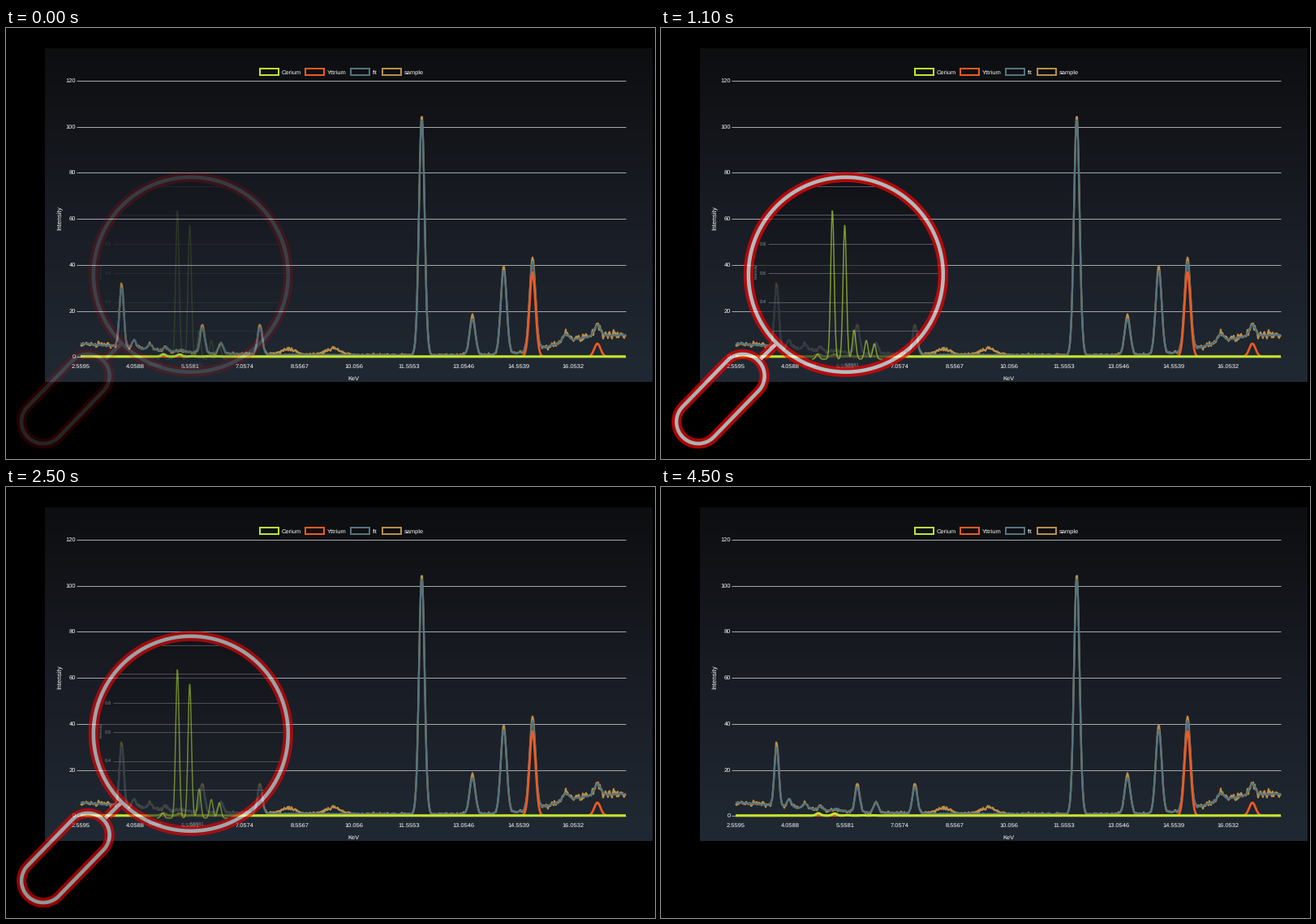
Animation, 800 px wide and 531 px high, one loop 4800 ms. Source, as a matplotlib script:

```python
import numpy as np
import matplotlib.pyplot as plt
from matplotlib.animation import FuncAnimation
from matplotlib.colors import LinearSegmentedColormap
from matplotlib.patches import Circle, Rectangle

W, H, DPI = 800, 531, 100
PX = 72 / DPI
FRAMES, STEP = 48, 100
PEAK, FADE = 1700, 2000  # time of full opacity and length of each fade, ms

LIME, ORANGE, TEAL, OCHRE = "#bee632", "#ee5a22", "#56737e", "#b98e48"
WHITE, RED, GRID = "#fafafa", "#fa0000", "#a4a8ac"

plt.rcParams.update({"font.family": "Liberation Sans", "toolbar": "None",
                     "text.hinting": "none", "lines.solid_capstyle": "butt",
                     "lines.solid_joinstyle": "round"})
fig = plt.figure(figsize=(W / DPI, H / DPI), dpi=DPI, facecolor="black")
ax = fig.add_axes([0, 0, 1, 1])
ax.axis("off")


def line(x, y, color, width, z):
    return ax.plot(x, y, color=color, lw=width * PX, zorder=z)[0]


def rule(x0, x1, y, color, z):
    """One-pixel horizontal line on a whole pixel row."""
    y = np.floor(y) + 0.5
    return line([x0, x1], [y, y], color, 1, z)


def label(x, y, s, size=7.5, ha="center", color="white", z=6, **kw):
    return ax.text(x, y, s, fontsize=size * PX, ha=ha, va="center_baseline",
                   color=color, zorder=z, **kw)


def gradient(x0, y0, x1, y1, colors, z):
    cmap = LinearSegmentedColormap.from_list("shade", colors)
    return ax.imshow(np.linspace(0, 1, 256)[:, None], cmap=cmap, zorder=z,
                     extent=(x0, x1, y1, y0), aspect="auto",
                     interpolation="bilinear")


def bells(x, peaks, width):
    return sum(h * np.exp(-((x - c) / width) ** 2 / 2) for c, h in peaks)


def tick(i):
    return f"{2.5595 + 1.4993 * i:.6g}"


# Chart frame
BASE, UNIT = 404.8, 56.74
gradient(48, 25, 796.5, 436, ["#0d0e10", "#191c24", "#202933"], 0)

for i in range(7):
    y = BASE - UNIT * i
    rule(87, 764, y, GRID, 1)
    label(86, y, str(20 * i), ha="right")
for i in range(10):
    label(92 + 67.45 * i, 416, tick(i))
label(428, 431, "KeV")
label(66, 234, "Intensity", size=8, rotation=90, rotation_mode="anchor")

for x, name, color in ((312, "Cerium", LIME), (368, "Yttrium", ORANGE),
                       (424, "fit", TEAL), (463, "sample", OCHRE)):
    ax.add_patch(Rectangle((x + 1, 50), 23, 8, fc="none", ec=color,
                           lw=2 * PX, zorder=5))
    label(x + 27.5, 54, name, ha="left")

# Spectrum: peaks widen with energy over a floor that decays, then rises
x = np.arange(92, 764.5)
width = 2.6 + 0.002 * (x - 92)
strong = [(142.5, 73), (242, 31), (313, 33), (512.5, 292),
          (575, 44), (613.5, 103), (649, 109)]
weak = [(265, 13), (690, 9), (729, 14)]
weak += [(158 + 19.3 * k, 10 * 0.66 ** k) for k in range(4)]
floor = 2 + 14 * np.exp(-((x - 92) / 105) ** 1.5)
floor += 25 / (1 + np.exp((675 - x) / 22))

rng = np.random.default_rng(7)
fit = floor + bells(x, strong + weak, width) + rng.normal(0, 0.35, x.size)
humps = bells(x, [(348, 7), (403, 8)], 9)
extra = bells(x, [(c, 4.5) for c, _ in strong], 2)
rough = 0.5 + 0.08 * floor + 0.12 * humps
sample = fit + humps + extra + rng.normal(0, 1, x.size) * rough
yttrium = bells(x, [(649, 104), (729, 16)], width)

# Cerium: tiny on the chart, magnified in the lens
cerium = [(170, 6), (194, 183), (214, 165), (229.2, 36), (249, 23), (262, 19)]

line(x, BASE - sample, OCHRE, 2.2, 2)
line(x, BASE - fit, TEAL, 2.3, 3)
line(x, BASE - yttrium, ORANGE, 2.7, 4)
line(x, BASE - bells(x, cerium, 2.8) / 65, LIME, 3, 5)

# Lens contents
CX, CY, R = 227.8, 303.8, 120
lens = Circle((CX, CY), 114, transform=ax.transData)
faint = dict(color="#c8cacc", z=11)
glass = [gradient(100, 180, 356, 430, ["#0f1014", "#191b21", "#202731"], 10)]

for i in range(1, 7):
    glass.append(rule(132, 341, 408.4 - 35.7 * i, "#70757b", 11))
for i in (2, 3, 4):
    glass.append(label(130, 408.4 - 35.7 * i, f"{0.2 * i:.1f}", size=5.8,
                       ha="right", **faint))
for i in (1, 2):
    glass.append(label(132 + 52 * i, 415, tick(i), size=5.8, **faint))
glass.append(label(117, 300, "Intensity", size=5, rotation=90,
                   rotation_mode="anchor", **faint))

zx = np.arange(186, 274, 0.4)
zoom = bells(zx, [(211.3 + 0.76 * (c - 194), h) for c, h in cerium], 2.1)
glass.append(line(zx, 408 - zoom, "#a9cf34", 1.5, 12))
for art in glass:
    art.set_clip_path(lens)


# Magnifier outline: ring, handle and neck
def ring(d):
    a = np.linspace(0, 2 * np.pi, 361)
    return CX + (R + d) * np.cos(a), CY + (R + d) * np.sin(a)


def handle(d):
    r = 26.8 + d
    a = np.radians(np.linspace(-135, 45, 60))
    px = np.r_[100.8 + r * np.cos(a), 45.9 - r * np.cos(a)]
    py = np.r_[428.7 + r * np.sin(a), 485.2 - r * np.sin(a)]
    return np.r_[px, px[0]], np.r_[py, py[0]]


def neck(d):
    s, trim = d / np.sqrt(2), 1 + 0.7 * abs(d)
    return (np.array([121.5 + trim, 142 - trim]) + s,
            np.array([409 - trim, 389 + trim]) + s)


# Red edges sit beside the white strokes so fading never tints them
for shape in (ring, handle, neck):
    for d in (-4.2, 4.2):
        glass.append(line(*shape(d), RED, 3.8, 14))
    glass.append(line(*shape(0), WHITE, 4.6, 16))

ax.set_xlim(0, W)
ax.set_ylim(H, 0)
ax.set_aspect("auto")


def update(i):
    alpha = max(0, 1 - abs(i * STEP - PEAK) / FADE)
    for art in glass:
        art.set_alpha(alpha)
        art.set_visible(alpha > 0)
    return glass


anim = FuncAnimation(fig, update, frames=FRAMES, interval=STEP,
                     init_func=lambda: update(0), repeat=True,
                     repeat_delay=0, blit=False)
plt.show()
```
